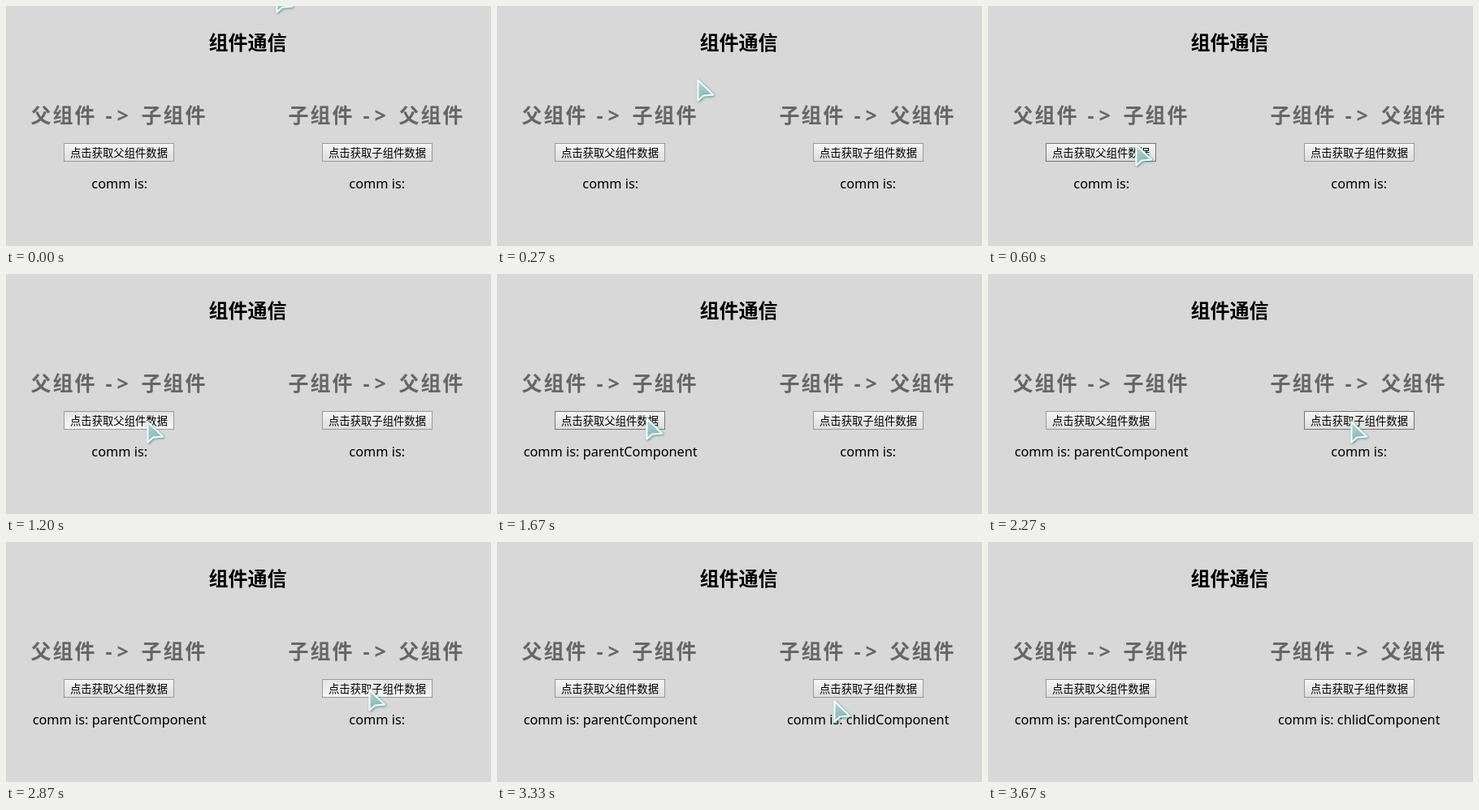
Recreate the animation shown at these times as an HTML page with a canvas. Size 597 by 296 pixels, loop 3740 ms.

```html
<!DOCTYPE html>
<html lang="zh-CN">
<head>
<meta charset="utf-8">
<style>
  html, body { margin: 0; width: 100%; height: 100%; overflow: hidden; background: #d8d8d8; }
  canvas { display: block; }
</style>
</head>
<body>
<canvas id="stage" width="597" height="296"></canvas>
<script>
const ctx = document.getElementById("stage").getContext("2d");
const LOOP = 3740;
const TICK = 1000 / 15;
const CJK = '"Noto Sans CJK SC", "Noto Sans CJK", sans-serif';
const LATIN = '"Noto Sans", "Open Sans", sans-serif';

// Pointer strokes: first tick, last tick, start, end, easing
const moves = [
  { from: 0, to: 8, a: [332, -19], b: [188, 162], ease: easeOut },
  { from: 8, to: 9, a: [188, 162], b: [181, 170], ease: p => p },
  { from: 9, to: 11, a: [181, 170], b: [173, 181], ease: p => p },
  { from: 24, to: 25, a: [173, 181], b: [183, 177], ease: p => p },
  { from: 25, to: 30, a: [183, 177], b: [365, 179], ease: p => p * (0.75 + 0.25 * p) },
  { from: 30, to: 34, a: [365, 179], b: [446, 181], ease: easeOut },
  { from: 49, to: 54, a: [446, 181], b: [234, 272], ease: p => p * (0.7 + 0.3 * p) },
  { from: 54, to: 55, a: [234, 272], b: [180, 310], ease: p => p }
];

function easeOut(p) {
  return p * (1.4 - 0.4 * p);
}

function pointerAt(tick) {
  let pos = moves[0].a;
  for (const { from, to, a, b, ease } of moves) {
    if (tick < from) break;
    const p = ease(Math.min(1, (tick - from) / (to - from)));
    pos = a.map((v, i) => Math.round(v + (b[i] - v) * p));
  }
  return pos;
}

function text(str, x, y, font, color, align = "left", spacing = 0) {
  ctx.font = font;
  ctx.fillStyle = color;
  ctx.textAlign = align;
  ctx.letterSpacing = spacing + "px";
  ctx.fillText(str, x, y);
}

function heading(first, second, x) {
  const font = "bold 25px ";
  text(first, x, 144, font + CJK, "#666", "left", 2);
  text("->", x + 92, 144, font + LATIN, "#666", "left", 6);
  text(second, x + 136, 144, font + CJK, "#666", "left", 2);
}

function button(label, x, hover, pressed) {
  const y = 169, w = 136, h = 23;
  const fill = ctx.createLinearGradient(0, y, 0, y + h);
  fill.addColorStop(0, pressed ? "#e4e4e4" : "#f5f5f5");
  fill.addColorStop(1, pressed ? "#f8f8f8" : "#dddddd");
  ctx.fillStyle = fill;
  ctx.fillRect(x, y, w, h);
  ctx.strokeStyle = hover && !pressed ? "#747678" : "#999";
  ctx.lineWidth = 1;
  ctx.strokeRect(x + 0.5, y + 0.5, w - 1, h - 1);
  text(label, x + w / 2, 186, "13.333px " + CJK, "#000", "center");
}

function pointer(x, y) {
  ctx.save();
  ctx.translate(x, y);
  const arrow = new Path2D("M1.5 1.5 L1.5 26.5 L8 20.5 L20 19.5 Z");
  ctx.lineJoin = "round";
  ctx.shadowColor = "#2f8a8a";
  ctx.shadowBlur = 3;
  ctx.shadowOffsetX = 1;
  ctx.shadowOffsetY = 1;
  ctx.strokeStyle = "#f2fafa";
  ctx.lineWidth = 2;
  ctx.stroke(arrow);
  ctx.shadowColor = "transparent";
  const fill = ctx.createLinearGradient(2, 4, 10, 23);
  fill.addColorStop(0, "#b8d2d2");
  fill.addColorStop(1, "#86b6b6");
  ctx.fillStyle = fill;
  ctx.fill(arrow);
  ctx.stroke(arrow);
  ctx.restore();
}

function over(px, py, x) {
  return px >= x && px < x + 136 && py >= 169 && py < 192;
}

function draw(tick) {
  const [px, py] = pointerAt(tick);
  ctx.fillStyle = "#d8d8d8";
  ctx.fillRect(0, 0, 597, 296);

  text("组件通信", 297.5, 54, "bold 24px " + CJK, "#000", "center");
  heading("父组件", "子组件", 30.5);
  heading("子组件", "父组件", 347.5);
  button("点击获取父组件数据", 71, over(px, py, 71), tick === 18);
  button("点击获取子组件数据", 389, over(px, py, 389), tick === 43);

  const body = "16.3px " + LATIN;
  text("comm is:" + (tick > 18 ? " parentComponent" : ""), 139.7, 225, body, "#000", "center");
  text("comm is:" + (tick > 43 ? " chlidComponent" : ""), 456.7, 225, body, "#000", "center");

  pointer(px, py);
}

function frame(now) {
  draw(Math.floor((now % LOOP + 4) / TICK) % 56);
  requestAnimationFrame(frame);
}
requestAnimationFrame(frame);
</script>
</body>
</html>
```
